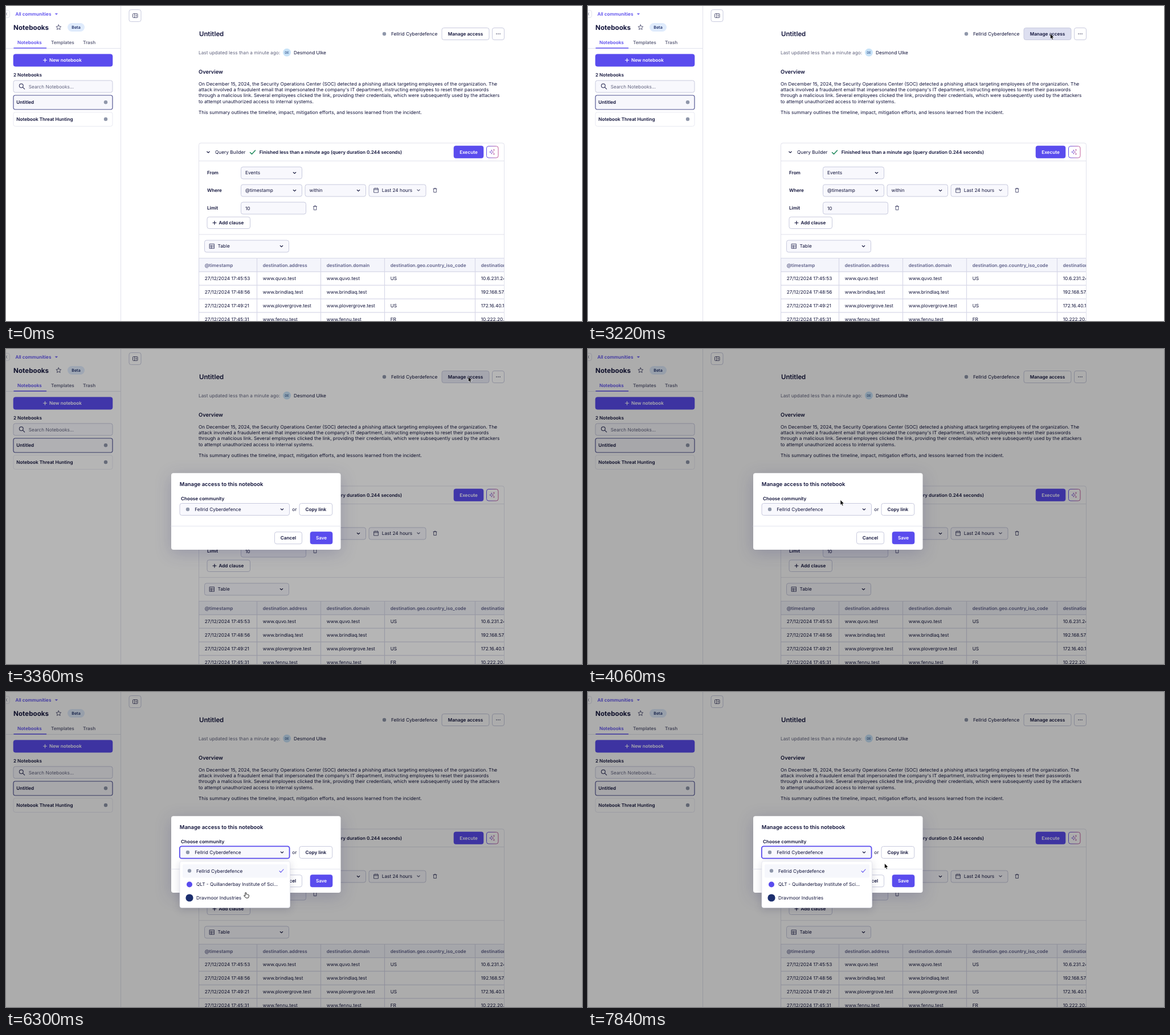
These frames come from a looping animation (1011x554 px, 8 s). An HTML page:

```html
<!DOCTYPE html>
<html lang="en">
<head>
<meta charset="utf-8">
<title>Notebook access</title>
<style>
html, body { margin: 0; width: 100%; height: 100%; overflow: hidden; background: #fff; }
svg { display: block; }
text { font-family: Inter, sans-serif; text-rendering: geometricPrecision; white-space: pre; }
#modal { transform-origin: 438.75px 285.5px; }
.raised { filter: drop-shadow(0 6px 14px rgba(30, 30, 110, .2)); }
.floating { filter: drop-shadow(0 3px 7px rgba(10, 10, 60, .16)); }
</style>
</head>
<body>
<svg id="stage" width="1011" height="554" viewBox="0 0 1011 554"></svg>
<script>
const INK = '#10123a', GREY = '#62647f', PURPLE = '#5a4cee', LINE = '#c8cade', PALE = '#e1e2ec', FIELD = '#f8f8fd';
const COMPANY = 'Fellrid Cyberdefence';

// y is the vertical middle of the capitals
const text = (s, x, y, { size = 8.25, weight = 400, fill = INK, anchor = 'start' } = {}) =>
  `<text x="${x}" y="${y + size * .36}" font-size="${size}" font-weight="${weight}" fill="${fill}" text-anchor="${anchor}">${s}</text>`;
const bold = (s, x, y, o = {}) => text(s, x, y, { size: 8.15, weight: 600, ...o });
const box = (x, y, w, h, { r = 3.5, fill = '#fff', stroke = LINE, sw = 1, extra = '' } = {}) =>
  `<rect x="${x}" y="${y}" width="${w}" height="${h}" rx="${r}" fill="${fill}" stroke="${stroke}" stroke-width="${sw}" ${extra}/>`;
const path = (d, stroke = INK, sw = 1, fill = 'none', extra = '') =>
  `<path d="${d}" stroke="${stroke}" stroke-width="${sw}" fill="${fill}" stroke-linecap="round" stroke-linejoin="round" ${extra}/>`;
const dot = (x, y, r, fill) => `<circle cx="${x}" cy="${y}" r="${r}" fill="${fill}"/>`;
const logo = (x, y) => dot(x, y, 3.2, '#8f97aa');
const chevron = (x, y, c = INK) => path(`M${x - 2.2} ${y - 1}l2.2 2.2 2.2-2.2`, c, 1.1);
const plus = (x, y, c) => path(`M${x - 3} ${y}h6M${x} ${y - 3}v6`, c, 1.1);
const trash = (x, y) => path(`M${x - 3} ${y - 2.6}h6M${x - 1} ${y - 3.6}h2M${x - 2.3} ${y - 2.6}v6.2h4.6v-6.2`, '#44466a', .9);
const button = (s, x, y, w, h = 21) =>
  box(x, y, w, h) + bold(s, x + w / 2, y + h / 2, { anchor: 'middle' });
const filled = (x, y, w, h = 21.5) => box(x, y, w, h, { fill: PURPLE, stroke: PURPLE, sw: .6 });
const primary = (s, x, y, w) =>
  filled(x, y, w) + bold(s, x + w / 2, y + 10.75, { anchor: 'middle', fill: '#fff' });
const select = (s, x, y, w, pad = 7.5) =>
  box(x, y, w, 21, { fill: FIELD }) + text(s, x + pad, y + 10.5) + chevron(x + w - 13, y + 10.5);

const sidebar = () => [
  path('M201.5 0V554', PALE),
  box(-8, 7.5, 14.5, 13, { stroke: PALE }), path('M1.5 12l-1.5 2 1.5 2', GREY, .8),
  bold('All communities', 16.5, 14.2, { fill: PURPLE }),
  path('M86.5 13.2h4l-2 2z', PURPLE, .5, PURPLE),
  bold('Notebooks', 13, 37.5, { size: 11.67, weight: 700 }),
  path('M92.3 33l1.3 2.9 3.1.3-2.3 2.1.7 3.1-2.8-1.6-2.8 1.6.7-3.1-2.3-2.1 3.1-.3z', '#44466a', .9),
  box(108, 30, 30, 15, { r: 7.5, fill: '#dfebfc', stroke: 'none' }),
  bold('Beta', 123, 37.5, { size: 7.1, anchor: 'middle', fill: '#1b2c66' }),
  path('M0 74.5H201', PALE), path('M14 74H70.5', PURPLE, 1.6),
  bold('Notebooks', 20, 63.8, { fill: PURPLE }),
  bold('Templates', 79, 63.8, { fill: GREY }), bold('Trash', 135, 63.8, { fill: GREY }),
  filled(13, 84.7, 174), plus(68.5, 95.3, '#fff'),
  bold('New notebook', 76, 95.3, { fill: '#fff' }),
  bold('2 Notebooks', 13, 121),
  box(13, 131, 174, 21, { fill: FIELD }),
  '<circle cx="26.8" cy="140.2" r="3.4" fill="none" stroke="#44466a" stroke-width="1.2"/>',
  path('M29.4 142.8l3.2 3.2', '#44466a', 1.2),
  text('Search Notebooks...', 39.8, 141.6, { fill: GREY }),
  box(13, 157, 174, 25, { fill: '#f7f7fc', stroke: '#4d5090', sw: 1.15 }), bold('Untitled', 18.3, 169.2), logo(175, 169.2),
  box(13, 186.8, 174, 24.7, { stroke: '#e8e9f2' }), bold('Notebook Threat Hunting', 18.3, 199), logo(175, 199)
].join('');

const page = () => [
  box(216, 6.5, 21, 21), box(222.5, 13.5, 8.5, 7, { r: 1, stroke: '#44466a', sw: .9 }),
  path('M225.5 13.5v7M227.5 16h2M227.5 18h2', '#44466a', .8),
  bold('Untitled', 339, 49, { size: 11.4 }),
  logo(664, 49), text(COMPANY, 676, 49.3),
  box(765, 38.5, 83, 21, { extra: 'id="access"' }), bold('Manage access', 806.5, 49, { anchor: 'middle' }),
  box(853.5, 38.5, 21, 21), [861, 864, 867].map(x => dot(x, 49, .75, INK)).join(''),
  text('Last updated less than a minute ago:', 338, 82.2, { fill: GREY }),
  dot(493, 81.8, 7, '#c8e3f8'), text('DE', 493, 82, { size: 5.8, anchor: 'middle', fill: '#1b3c78' }),
  text('Desmond Ulke', 505, 82),
  bold('Overview', 338, 115.3, { size: 9.3 }),
  ['On December 15, 2024, the Security Operations Center (SOC) detected a phishing attack targeting employees of the organization. The',
   'attack involved a fraudulent email that impersonated the company\'s IT department, instructing employees to reset their passwords',
   'through a malicious link. Several employees clicked the link, providing their credentials, which were subsequently used by the attackers',
   'to attempt unauthorized access to internal systems.'
  ].map((s, i) => text(s, 338, 137 + i * 10.2, { size: 8.28 })).join(''),
  text('This summary outlines the timeline, impact, mitigation efforts, and lessons learned from the incident.', 338, 187.3, { size: 8.28 })
].join('');

const builder = () => [
  box(338.5, 241, 536, 340, { stroke: PALE }), path('M338.5 272.5H874.5M338.5 401.8H874.5', PALE),
  chevron(355, 257), text('Query Builder', 367, 257.3),
  path('M428.5 257.5l3 3 6-6.5', '#1f8a5c', 1.5),
  bold('Finished less than a minute ago (query duration 0.244 seconds)', 444.8, 257.3),
  primary('Execute', 786, 246, 52),
  box(843.5, 246.5, 20.5, 20.5, { stroke: 'url(#spark)' }),
  path('M852.3 253.2l1 2.6 2.6 1-2.6 1-1 2.6-1-2.6-2.6-1 2.6-1zM856.4 252v2.4M855.2 253.2h2.4M856.4 259v2.4M855.2 260.2h2.4', 'url(#spark)', .8),
  bold('From', 353, 293), bold('Where', 353, 324), bold('Limit', 353, 354.7),
  select('Events', 412.5, 283, 107), select('@timestamp', 412.5, 314, 107), select('within', 525, 314, 106.5),
  box(637, 314, 100, 21, { fill: FIELD }),
  path('M646 321h7.4v7h-7.4zM646 323h7.4M648 319.8v1.5M651.4 319.8v1.5', '#44466a', .9),
  text('Last 24 hours', 659.8, 324.5), chevron(724, 324, GREY), trash(753, 324),
  box(412.5, 345, 114, 21, { fill: FIELD }), text('10', 420, 355.6), trash(542.5, 355),
  box(353, 371, 75.5, 20.5), plus(366, 381.2, INK), bold('Add clause', 373.5, 381.3),
  select('Table', 348.5, 412, 148, 23),
  path('M357.5 418.5h8v8h-8zM357.5 421.2h8M357.5 423.8h8M360.5 421v5.5', '#44466a', .9)
].join('');

function table() {
  const cols = [338.5, 440.5, 552.5, 664.5, 823.5];
  const heads = ['@timestamp', 'destination.address', 'destination.domain', 'destination.geo.country_iso_code', 'destination.ip'];
  const rows = [
    ['45:53', 'www.quvo.test', 'US', '10.6.231.24'],
    ['48:56', 'www.brindlaq.test', '', '192.168.57.8'],
    ['49:21', 'www.plovergrove.test', 'US', '172.16.40.19'],
    ['45:31', 'www.fennu.test', 'FR', '10.222.20.16']
  ];
  let s = box(338.5, 443.5, 560, 23.7, { r: 0, fill: '#f4f5fb', stroke: 'none' });
  heads.forEach((h, c) => s += bold(h, cols[c] + 10.2, 455.8, { fill: '#5f618a' }));
  rows.forEach(([time, host, code, ip], r) =>
    [`27/12/2024 17:${time}`, host, host, code, ip].forEach((v, c) => s += text(v, cols[c] + 10.2, 479.5 + r * 23.8)));
  for (let i = 0; i < 5; i++) s += path(`M338 ${443.5 + i * 23.85}H875`, '#d7d8e8', 1.2);
  cols.forEach(x => s += path(`M${x} 443.5V560`, '#d7d8e8', 1.2));
  return `<g clip-path="url(#tableClip)">${s}</g>` + path('M874.5 443V554', PALE);
}

const modal = () => [
  box(290, 218.3, 297.5, 134.7, { r: 4, stroke: 'none', extra: 'class="raised"' }),
  bold('Manage access to this notebook', 304.8, 238, { size: 9.38 }),
  bold('Choose community', 307, 263),
  select(COMPANY, 305, 271.5, 192.5, 26.3), logo(319, 282),
  box(304.8, 271.3, 192.8, 21.4, { fill: 'none', stroke: PURPLE, extra: 'id="focus"' }),
  text('or', 502.3, 282.3), button('Copy link', 515, 271.5, 57.7),
  path('M290 311.5H587.5', '#e4e5ee'),
  button('Cancel', 471.5, 321.8, 48), primary('Save', 534, 321.5, 39)
].join('');

const menu = () => [
  box(305, 297.5, 193.5, 82, { stroke: '#dfe0ea', sw: .7, extra: 'class="floating"' }),
  box(310, 303, 184, 23.5, { r: 2.5, fill: '#f6f7fc', stroke: 'none' }),
  text(COMPANY, 334, 314.7), path('M480 314.8l2.3 2.4 4.7-5.2', PURPLE, 1.1),
  text('QLT - Quillanderbay Institute of Sci...', 334, 338.5), text('Dravmoor Industries', 334, 362.3),
  `<g id="icons">${logo(322, 314.5)}${dot(322, 338.5, 5, PURPLE)}${dot(322, 362, 6.6, '#1c2f6e')}</g>`
].join('');

const $ = id => document.getElementById(id);
$('stage').innerHTML = `
  <defs>
    <linearGradient id="spark"><stop stop-color="#6455e8"/><stop offset="1" stop-color="#c4609c"/></linearGradient>
    <clipPath id="tableClip"><rect x="338" y="443" width="536.5" height="111"/></clipPath>
  </defs>
  ${sidebar()}${page()}${builder()}${table()}
  <rect id="shade" width="1011" height="554" fill="#000"/>
  <g id="modal">${modal()}</g>
  <g id="menu">${menu()}</g>
  <g id="cursor">
    <circle id="ring" r="17.3" fill="none" stroke="#111" stroke-width="1.7"/>
    ${path('M0 0V8.8L2 7.1 3.3 10.2 4.9 9.5 3.6 6.5H6.3Z', '#fff', .6, '#000', 'id="arrow"')}
    ${path('M-1 6V1.2Q0 -.1 .9 1.2V4Q1.9 3.5 2.6 4.3 3.6 3.8 4.2 4.7 5.6 4.5 5.6 5.9 5.6 8.5 4.3 10.3H.2Q-1.6 8.3 -3.4 6.3 -2.8 5 -1 6.4z', '#111', .9, '#fff', 'id="hand"')}
  </g>`;

// Cursor stops: time, x, y; it eases from each one to the next
const stops = [
  [770, 606, 338], [910, 795, 19], [1190, 795, 19], [1470, 828, 111], [1960, 828, 111],
  [2380, 811.5, 49], [3780, 811.5, 49], [4060, 443, 265.5], [4410, 443, 265.5], [4620, 425.3, 286.5],
  [5670, 425.3, 286.5], [6510, 420, 364], [6580, 420, 365], [7210, 420, 365], [7840, 520.5, 301.5]
];
const clamp = v => Math.max(0, Math.min(1, v));

function cursorAt(t) {
  const i = Math.max(1, stops.findIndex(s => s[0] >= t));
  const [t0, x0, y0] = stops[i - 1], [t1, x1, y1] = stops[i];
  const u = clamp((t - t0) / (t1 - t0)), e = u * u * (3 - 2 * u);
  return [x0 + (x1 - x0) * e, y0 + (y1 - y0) * e];
}
const show = (id, on) => $(id).style.display = on ? '' : 'none';

function draw(now) {
  const t = Math.min(7840, Math.floor(now % 8000 / 70) * 70);
  const [x, y] = cursorAt(t), hand = t >= 4550 && x < 499;
  const open = clamp((t - 3220) / 140);
  const dim = 1 - (1 - clamp((t - 3220) / 225)) ** 2.3;
  const hover = t < 2800 ? 0 : 1 - clamp((t - 3290) / 210);
  $('access').setAttribute('fill', `rgba(221,223,240,${hover})`);
  $('shade').style.opacity = .325 * dim;
  $('modal').style.opacity = open;
  $('modal').style.transform = `scale(${.954 + .046 * open})`;
  show('focus', t >= 4550);
  $('focus').setAttribute('stroke-width', t >= 5180 ? 1.8 : 1);
  show('menu', t >= 5250);
  $('icons').style.opacity = clamp((t - 5320) / 140);
  show('cursor', t >= 770);
  $('cursor').setAttribute('transform', `translate(${x} ${y})`);
  show('arrow', !hand);
  show('hand', hand);
  show('ring', t === 3150 || t === 5180);
}

const start = performance.now();
function tick() {
  draw(performance.now() - start);
  requestAnimationFrame(tick);
}
tick();
</script>
</body>
</html>
```
